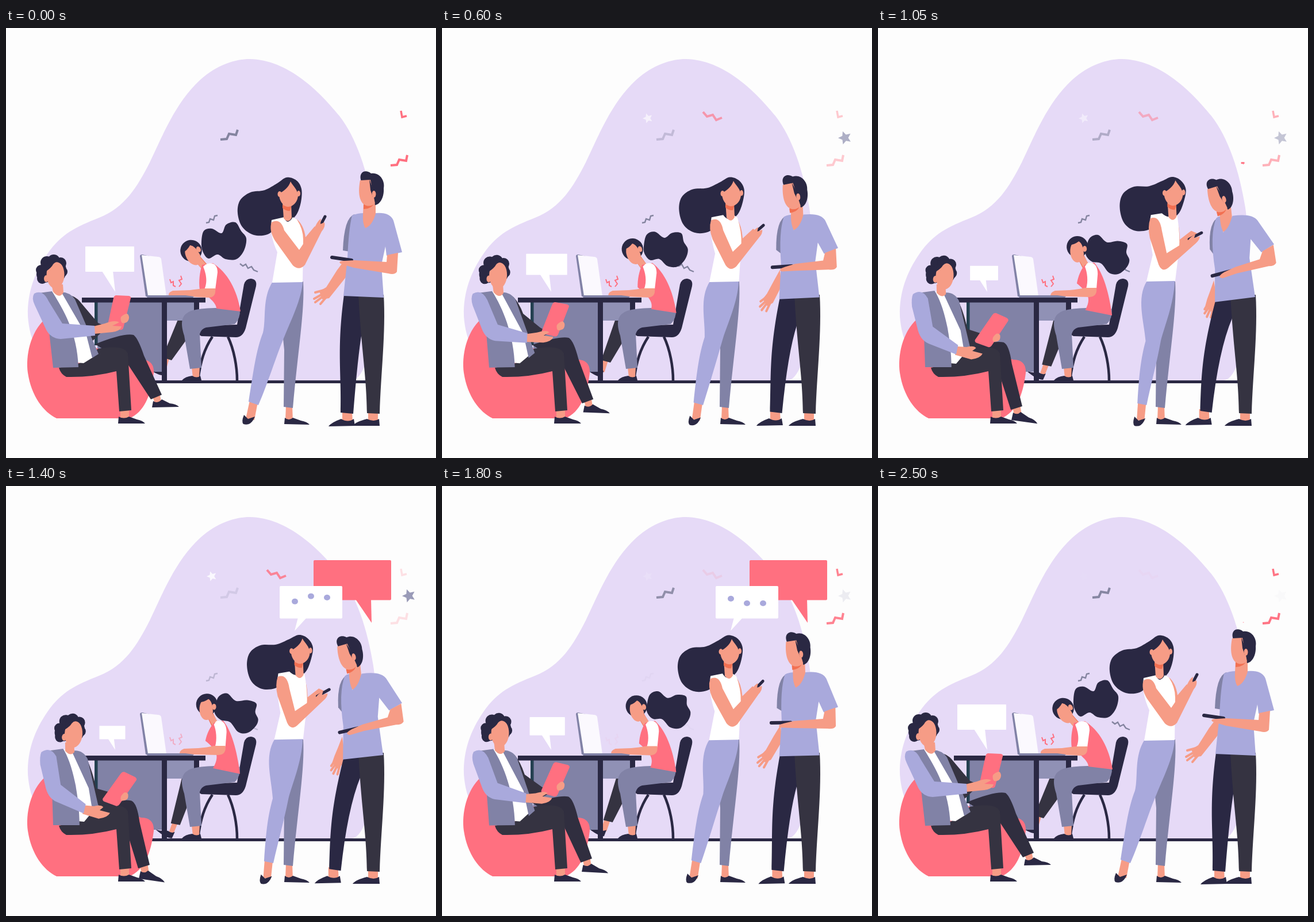
Write an HTML page with a canvas that moves like this. It is 748x748 px and loops after 2.55 s.

```html
<!DOCTYPE html>
<html>
<head>
<meta charset="utf-8">
<style>
html, body { margin: 0; width: 100%; height: 100%; overflow: hidden; background: #fdfdfd; }
canvas { display: block; width: 748px; height: 748px; }
</style>
</head>
<body>
<canvas id="stage" width="748" height="748"></canvas>
<script>
const ctx = document.getElementById('stage').getContext('2d');
const LOOP = 2550;
const PAPER = '#fdfdfd', MIST = '#e6daf7', DARK = '#2a2843', PANTS = '#353341', LILAC = '#a9a9dc',
  SLATE = '#8182a6', GREY = '#84849f', PINK = '#ff7080', SKIN = '#f69c86', SHADE = '#f27052', WHITE = '#fff';

const NUM = /-?\d+(\.\d+)?/g;
const clamp = x => Math.min(1, Math.max(0, x));
const ease = x => (1 - Math.cos(Math.PI * clamp(x))) / 2;
const hump = (t, start, peak, end) =>
  t < peak ? ease((t - start) / (peak - start)) : ease((end - t) / (end - peak));
const backOut = x => { x = clamp(x) - 1; return 1 + 3 * x ** 3 + 2 * x * x; };

// Blend two descriptions that hold the same count of numbers.
function mix(a, b, u) {
  if (!b) return a;
  const to = b.match(NUM);
  let i = 0;
  return a.replace(NUM, n => +n + (to[i++] - n) * u);
}

// Closed smooth curve through points.
function smooth(text) {
  const v = text.match(NUM).map(Number), n = v.length / 2;
  const at = i => { i = (i + n) % n; return [v[2 * i], v[2 * i + 1]]; };
  let d = 'M' + at(0);
  for (let i = 0; i < n; i++) {
    const [p, q, r, s] = [at(i - 1), at(i), at(i + 1), at(i + 2)];
    d += `C${q.map((x, k) => x + (r[k] - p[k]) / 6)} ${r.map((x, k) => x - (s[k] - q[k]) / 6)} ${r}`;
  }
  return d + 'Z';
}

function fill(color, a, b, u) {
  const d = mix(a, b, u);
  ctx.fillStyle = color;
  ctx.fill(new Path2D(d[0] === 'M' ? d : smooth(d)));
}

function line(color, width, a, b, u, cap = 'butt') {
  ctx.strokeStyle = color;
  ctx.lineWidth = width;
  ctx.lineCap = cap;
  ctx.stroke(new Path2D(mix(a, b, u)));
}

function oval(color, x, y, rx, ry = rx, turn = 0) {
  ctx.fillStyle = color;
  ctx.beginPath();
  ctx.ellipse(x, y, rx, ry, turn, 0, 7);
  ctx.fill();
}

function box(color, x, y, w, h, r = 0) {
  ctx.fillStyle = color;
  ctx.beginPath();
  ctx.roundRect(x, y, w, h, r);
  ctx.fill();
}

function star(color, x, y, r) {
  let d = '';
  for (let i = 0; i < 10; i++) {
    const a = i * Math.PI / 5 - .65, k = i % 2 ? r * .47 : r;
    d += (i ? 'L' : 'M') + (x + k * Math.cos(a)) + ' ' + (y + k * Math.sin(a));
  }
  fill(color, d + 'Z');
}

function group(x, y, turn, scale, draw) {
  ctx.save();
  ctx.translate(x, y);
  ctx.rotate(turn);
  ctx.scale(scale, scale);
  draw();
  ctx.restore();
}

function faded(alpha, draw) {
  ctx.globalAlpha = clamp(alpha);
  draw();
  ctx.globalAlpha = 1;
}

function backdrop(t) {
  ctx.fillStyle = PAPER;
  ctx.fillRect(0, 0, 748, 748);
  fill(MIST, 'M38 500C37 460 50 425 72 393C97 357 122 346 162 330C207 312 228 277 250 234C273 187 293 132 338 90C368 63 400 54 424 54C490 55 545 110 580 153C610 192 629 250 639 313C650 390 652 520 625 585C618 603 610 613 600 613L120 613C60 600 40 540 38 500Z');
  const blink = (1 + Math.cos(t / LOOP * 6 * Math.PI)) / 2;
  faded(blink, () => {
    line(GREY, 4, 'M373 194L384 193L388 184L400 186L403 177');
    line(PINK, 3.5, 'M687 144L689 155L697 153');
    line(PINK, 4, 'M669 239L680 238L684 229L696 231L698 221');
  });
  faded(1 - blink, () => {
    line(PINK, 4, 'M454 146L461 154L471 151L477 160L487 156');
    star(WHITE, 358, 157, 9);
    star(SLATE, 701, 191, 12);
  });
  faded(1 - hump(t, 1000, 1720, 2300), () => {
    line(GREY, 2.4, 'M348 339L353 338L355 332L361 334L363 327L368 326');
    line(GREY, 2.4, 'M407 410L412 414L417 411L421 418L427 415L431 421L438 424');
    line(PINK, 2, 'M285 437L287 443L291 441L291 448L295 450M304 431L306 437L301 439L305 445L301 450');
  });
  box(DARK, 240, 613, 395, 5);
}

function desk(u) {
  // The far leg passes behind the panel.
  fill(SKIN, 'M275 565L286 568L278 596L266 594Z', 'M290 585L299 587L292 604L284 602Z', u);
  fill(DARK, 'M240 587Q248 591 264 593Q269 597 275 593L272 604Q262 604 240 587Z', 'M261 598Q270 601 282 600Q288 605 294 602L289 613Q278 613 261 598Z', u);
  fill(PANTS, 'M302 500C310 488 330 488 345 495L330 520L288 578L272 573Z', 'M308 500C316 488 330 488 345 495L330 520L303 590L287 587Z', u);
  box(SLATE, 159, 477, 112, 121);
  box('#9091b5', 280, 477, 47, 32);
  box(DARK, 271, 477, 9, 137);
  box(DARK, 327, 477, 9, 45);
  box('#244050', 154, 477, 5.5, 75);
  box(DARK, 132, 469, 215, 8.5);
}

function chair() {
  fill(DARK, 'M414 446Q417 436 426 436Q437 437 435 449L417 522Q412 538 400 538L340 536Q330 532 332 518L402 516Z');
  line(DARK, 4.5, 'M359 537C345 558 338 580 334 613M386 537C397 560 402 590 402 613');
}

function typist(u) {
  // The ponytail swings ahead of the body.
  fill(DARK, '340 372 344 353 358 349 375 357 383 342 399 338 409 353 418 366 414 387 401 402 382 402 368 394 352 401 342 388',
    '364 386 370 367 385 361 400 374 420 373 436 379 434 394 439 407 434 419 420 430 404 428 390 411 374 407 364 397', u ** .7);
  fill(SKIN, 'M323 590L337 590L336 608L325 608Z');
  fill(SLATE, 'M407 489C400 486 350 486 330 490C305 495 302 510 310 535L320 593L340 591L337 532Q340 523 348 521L398 515Q408 505 407 489Z');
  fill(DARK, 'M306 613Q312 606 324 605Q332 610 338 605L340 613Z');
  line(SHADE, 12, 'M332 400L345 415', 'M354 395L364 416', u);
  line(SKIN, 11, 'M335 404L346 417', 'M356 399L366 417', u);
  fill(PINK, 'M341 412L360 409C385 425 402 455 408 493L366 488C366 478 352 468 337 455C335 440 337 425 341 412Z',
    'M362 412L378 408C392 425 402 460 407 501L360 491C372 470 368 460 347 443C350 430 355 420 362 412Z', u);
  fill(WHITE, 'M348 411C360 406 368 412 368 425L364 455L345 455C352 440 347 425 343 415Z',
    'M366 409C378 405 384 415 384 428L382 454L364 454C368 440 366 425 362 415Z', u);
  fill(SKIN, 'M345 453L364 453Q366 469 352 469L310 467L284 466Q280 461 290 457L320 456Q335 454 345 453Z',
    'M362 452L382 452Q384 467 370 468L325 467L303 467Q300 461 310 457L335 456Q350 455 362 452Z', u);
  group(324 + 26 * u, 391 - 7 * u, -.5 + .5 * u, 1.04, () => {
    oval(DARK, 0, -4, 18, 18);
    oval(SKIN, -1, 4, 11.5, 18);
    fill(DARK, 'M-15 -8Q0 -26 13 -10Q16 2 10 10Q10 -8 3 -13Q-6 -7 -15 -8Z');
    oval(SKIN, 12, 0, 3.5, 5);
  });
}

function laptop() {
  fill(SLATE, 'M233 397Q233 394 237 394L250 397L258 467L243 467Z');
  fill('#fbf9fe', 'M236 395L264 398Q269 398 270 402L279 466L247 466Z');
  fill(SLATE, 'M243 465L312 465L327 467L325 469L246 469Z');
}

function lounger(u, shrink) {
  fill(PINK, 'M68 506C42 530 34 570 38 600C44 640 65 668 88 679L215 679C240 668 252 640 257 600C258 584 249 577 236 577L150 555Z');
  // Legs and shoes
  fill(SKIN, 'M255 640L267 634L270 650L259 654Z', 'M232 660L245 655L248 676L235 677Z', u);
  fill(DARK, 'M254 660L256 649Q264 654 271 646L285 653Q296 654 301 659Z', 'M230 684L233 671Q240 676 246 670L260 680Q271 684 275 691Z', u);
  fill('#302e3f', 'M155 550Q205 530 222 534Q230 540 240 570L271 638L252 646L212 585Z', 'M160 553Q205 545 218 548Q228 552 232 585L249 660L229 666L205 585Z', u);
  fill(SKIN, 'M199 662L214 662L214 681L199 681Z');
  fill(DARK, 'M195 688L196 676Q205 681 214 676L228 681Q238 683 242 688Z');
  fill(PANTS, 'M92 591L128 583L160 558Q205 550 212 566L218 665L197 667L192 597Q150 608 105 607Q95 602 92 591Z');
  // Torso
  fill(PANTS, 'M115 466Q125 470 132 480L160 513L176 520L158 537L150 545Z', 'M138 468Q150 490 158 528L190 536L205 550L165 560L150 545Z', u);
  fill(WHITE, 'M80 458L100 458L142 535L151 573L135 583L122 582L118 540Z', 'M102 458L120 460L147 530L154 562L136 584L125 583L122 520Z', u);
  fill(SLATE, 'M50 462L80 458C100 490 124 530 126 590L82 591L74 520Z', 'M64 462L100 457C116 480 128 540 128 590L82 590L80 520Z', u);
  fill(SLATE, 'M96 459Q112 460 120 472L161 567L150 574L140 535Z', 'M115 461Q134 457 143 475L162 562L152 574L144 525Z', u);
  // Neck and head
  fill(SKIN, 'M79 446L99 446L100 460Q93 472 82 459Z', 'M104 446L119 446L120 463Q113 471 104 461Z', u);
  const bumps = [[-22, 8, 9], [-24, -7, 9], [-14, -20, 11], [-2, -23, 11], [10, -19, 10], [13, -4, 9], [-17, 0, 15]];
  group(85 + 33 * u, 428 + 2 * u, .06 * u, 1, () => {
    for (const [x, y, r] of bumps) oval(DARK, x, y, r);
    oval(DARK, 1, -6, 19, 22);
    oval(SKIN, 1, 1, 15.5, 24);
    fill(DARK, 'M-15 -5Q-6 -11 -3 -17Q4 -26 14 -14L12 -24L-12 -25Z');
    oval(SKIN, -15, 8, 4, 6);
  });
  // Tablet, hands and near sleeve
  fill(PINK, 'M192 465L214 466Q218 467 217 470L204 522Q202 526 198 525L179 521Q176 519 177 516L187 470Q188 465 192 465Z',
    'M207 499L225 508Q229 511 227 514L198 554Q195 559 191 558L170 550Q167 548 168 545L200 502Q203 498 207 499Z', u);
  fill(SKIN, '200 503 210 497 214 503 211 511 202 513', '200 542 206 535 212 537 211 546 201 549', u);
  fill(SKIN, 'M152 519L172 514Q190 507 197 512L185 518L201 519Q199 527 185 529L154 532Z',
    'M134 557L152 559Q165 556 168 561L162 566L180 571Q176 579 160 581L132 572Z', u);
  fill(LILAC, 'M49 462Q64 454 74 475L98 514L154 518L155 535L95 541Q78 540 70 525L50 482Q44 470 49 462Z',
    'M62 463Q78 452 88 470L95 520L138 555L134 571L88 550Q72 543 68 520L60 485Q59 470 62 463Z', u);
  group(190, 459, 0, 1 - .48 * shrink, () => {
    box(WHITE, -52, -79, 85, 44, 1);
    fill(WHITE, 'M-23 -36L-4 -36L0 0Z');
  });
}

function woman(u) {
  fill(DARK, '505 265 488 260 472 270 450 282 425 286 407 300 403 322 411 346 431 360 455 359 475 344 490 338 505 325 513 303 514 280',
    '527 265 512 259 495 266 472 275 445 276 426 289 421 312 428 338 446 352 470 351 490 338 508 333 524 322 533 300 536 280', u);
  // Legs and shoes
  fill(SKIN, 'M487 657L498 657L499 685L486 682Z');
  fill(DARK, 'M484 689L485 678Q492 684 499 678L513 683Q524 685 528 690Z');
  fill(SLATE, 'M517 441C520 490 508 560 499 661L483 659L484 560L478 500L490 441Z');
  fill(SKIN, 'M424 648L438 651L432 682L417 680Z', 'M453 650L467 653L464 684L451 682Z', u);
  fill(DARK, 'M414 673Q409 685 413 689Q424 692 430 682L433 676L421 680Z', 'M447 676Q443 688 447 692Q457 695 463 685L466 679L454 683Z', u);
  fill(LILAC, 'M464 441L516 441C515 470 495 510 485 535C470 570 455 620 439 656L422 650C430 600 435 560 447 530C453 505 445 470 464 441Z',
    'M468 440L516 440C515 480 498 520 492 545C485 585 475 620 468 656L452 653C455 600 458 575 466 545C463 510 449 470 468 440Z', u);
  // Far arm, top and neck
  fill(SKIN, 'M505 332Q518 342 521 364L537 345L546 355L528 385L512 390Z', 'M519 330Q525 345 525 368L545 353L555 357L548 368L525 385L514 390Z', u);
  fill(WHITE, 'M462 334L484 329Q489 345 499 329L506 333Q517 350 517 368L516 442L463 443L472 390Q458 360 462 334Z',
    'M475 325L494 322Q508 334 515 322L521 327Q526 360 524 385L517 440L467 441L478 395Q470 350 475 325Z', u);
  group(23 * u, -2 * u, 0, 1, () => {
    fill(SKIN, 'M481 303L496 305L497 330Q491 341 483 331Z');
    fill(SHADE, 'M481 307Q490 314 497 308L494 318Q487 319 481 313Z');
    fill(SKIN, 'M495 267C499 275 508 281 508 293C506 305 498 311 490 311C481 309 475 300 475 288C483 284 492 277 495 267Z');
    oval(SKIN, 476, 289, 3.5, 5);
    oval(SKIN, 509, 288, 3, 5);
  });
  // Phone and near arm
  line(DARK, 5, 'M546 345L555 328', 'M541 368L563 357', u, 'round');
  fill(SKIN, 'M462 338Q478 330 484 352L510 386L538 345Q543 334 548 332L547 341L554 338Q556 346 549 354L520 412Q510 423 499 413L468 370Q457 352 462 338Z',
    'M474 331Q490 325 494 352L502 392L540 369Q546 362 552 360L550 366L560 363Q560 369 553 375L505 417Q494 426 488 412L473 365Q469 345 474 331Z', u);
}

function man(u) {
  // Far arm
  fill(SKIN, 'M592 400L594 430L562 470L550 472L545 458L557 451L576 421Z', 'M584 440L588 465L588 486L580 494L570 484L573 472L578 458Z', u);
  line(SKIN, 4, 'M553 456L538 460M552 462L536 471M554 465L538 477M558 467L547 480', 'M576 478L569 490M579 482L569 497M581 484L573 503M584 486L580 504', u, 'round');
  // Legs and shoes
  group(-27 * u, -2 * u, 0, 1, () => {
    fill(SKIN, 'M585 665L602 667L603 686L585 685Z');
    fill(DARK, 'M561 693Q566 686 583 680Q595 687 605 680L607 692Z');
  });
  fill(DARK, 'M588 464L634 464L619 530Q612 570 604 671L582 669C584 600 575 560 588 464Z', 'M588 471L634 468L616 504Q592 560 580 669L560 666C562 600 564 560 588 471Z', u);
  fill(SKIN, 'M630 665L647 665L647 685L630 685Z');
  fill(DARK, 'M603 692Q608 685 628 680Q640 686 649 680L650 692Z');
  fill(PANTS, 'M613 464L657 464C661 530 652 600 650 671L628 670C627 600 618 560 613 464Z');
  // Shirt
  fill(SLATE, 'M606 324Q588 330 586 387L598 389L606 340Z', 'M594 329Q574 335 577 385L588 400L594 340Z', u);
  fill(LILAC, 'M602 326Q612 322 622 322L625 347L643 322Q668 320 674 335L689 390L662 396L660 380L653 412L657 469L587 466L594 400Q596 350 602 326Z',
    'M588 331Q592 327 595 328L600 356L616 327Q650 322 660 335L689 376L667 390L648 367L646 400L656 468L586 477L586 420Q576 360 588 331Z', u);
  fill(SKIN, 'M622 304L643 302L643 323Q637 344 625 348Q620 340 621 324Z', 'M594 314L613 310L615 328Q610 349 600 355Q595 346 594 328Z', u);
  // Head
  group(630 - 33 * u, 312 + 11 * u, -.25 * u, 1, () => {
    fill(SHADE, 'M-8 -5L11 -9Q8 2 -8 3Z');
    fill(DARK, 'M-12 -45C-18 -62 -4 -67 5 -59C20 -62 30 -46 27 -33C28 -18 21 -5 12 -4L4 -42Z');
    fill(SKIN, 'M-14 -47L4 -48Q6 -37 8 -28L12 -7Q5 -1 -3 -3C-16 -7 -18 -27 -14 -47Z');
    fill(DARK, 'M2 -49L9 -30L8 -18Q6 -24 4 -30Z');
    oval(SKIN, 10, -23, 3.5, 6);
  });
  // Phone and near arm
  line(DARK, 6, 'M567 399L601 404', 'M582 432L615 423', u, 'round');
  fill(SKIN, 'M663 395L682 391L680 424Q676 430 665 427L605 417L582 410Q576 405 590 405L606 404L662 407Z',
    'M669 388L688 377L693 408Q690 414 680 414L625 427L600 436Q588 434 603 425L622 416L664 402Z', u);
}

function chat(t) {
  const pop = (from, to) => Math.max(0, backOut(t < 1700 ? (t - from) / 340 : (to - t) / 400));
  group(636, 238, 0, pop(1048, 2502), () => {
    box(PINK, -101, -109, 135, 69.5, 2);
    fill(PINK, 'M-28 -41L-1 -41L0 0Z');
  });
  group(502, 252, 0, pop(1060, 2495), () => {
    box(WHITE, -26, -78, 109, 56.5, 2);
    fill(WHITE, 'M6 -23L21 -23L0 0Z');
    for (let i = 0; i < 3; i++) {
      const phase = (t - 1115 - 100 * i + 1240) % 620;
      const hop = phase < 310 ? Math.sin(Math.PI * phase / 310) : 0;
      oval(LILAC, .5 + 28 * i, -48 - 13 * hop, 5.5, 5);
    }
  });
}

function frame(now) {
  const t = now % LOOP;
  const standing = hump(t, 0, 1170, 2280);
  const lounging = hump(t, 150, 1265, 2280);
  const typing = hump(t, 150, 1300, 2420);
  backdrop(t);
  desk(typing);
  chair();
  typist(typing);
  laptop();
  lounger(lounging, typing);
  woman(standing);
  man(standing);
  chat(t);
  requestAnimationFrame(frame);
}
requestAnimationFrame(frame);
</script>
</body>
</html>
```
